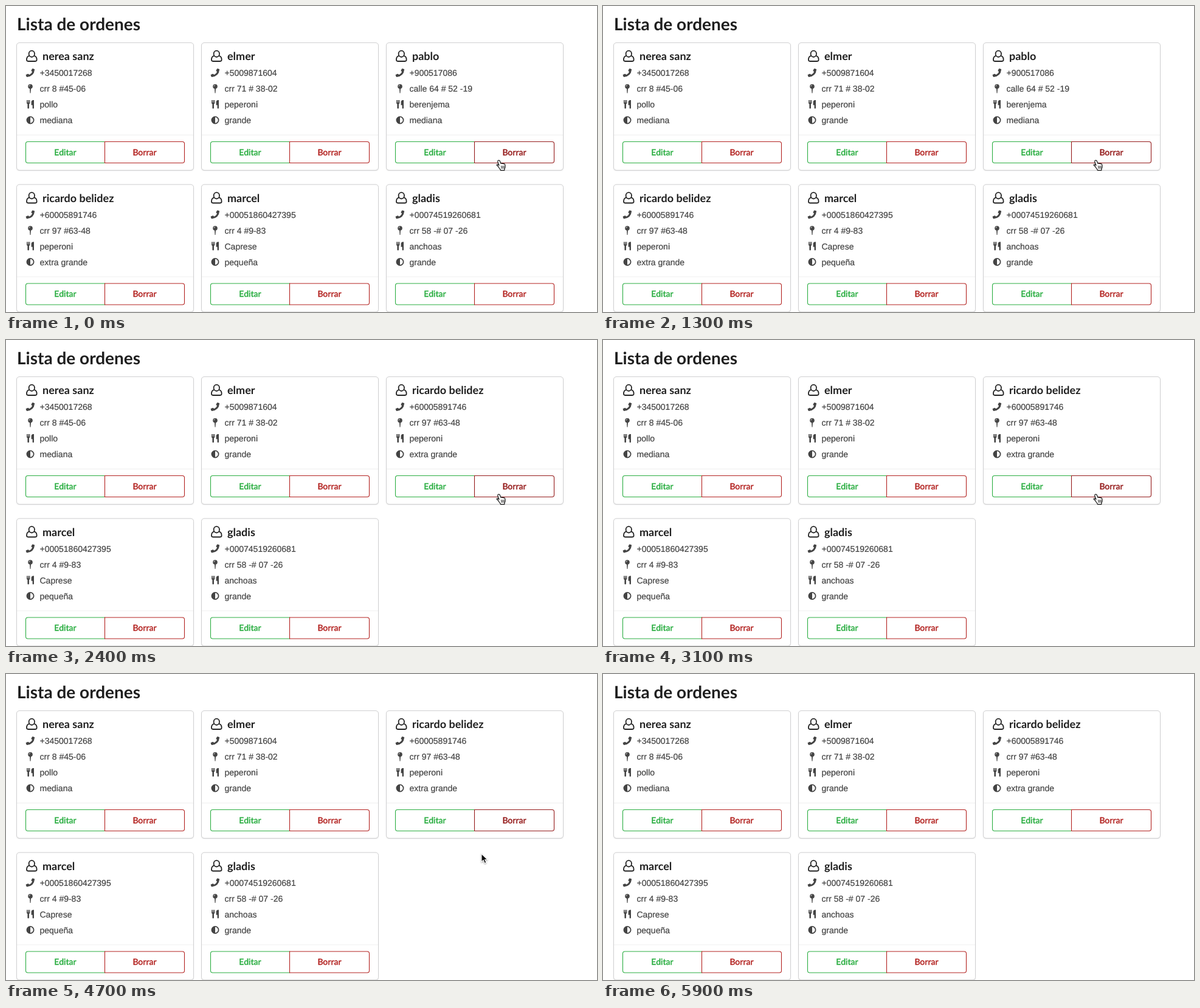
An HTML page for the animation above (6 s loop, 972 px wide and 504 px high).

```html
<!DOCTYPE html>
<html lang="es">
<head>
<meta charset="utf-8">
<title>Lista de ordenes</title>
<style>
  html, body { margin: 0; width: 100%; height: 100%; overflow: hidden; background: #fff; }
  svg { display: block; }
  text { white-space: pre; text-rendering: geometricPrecision; }
  .title, .name { font-family: Lato, sans-serif; font-weight: 700; fill: #1f1f1f; }
  .title { font-size: 28px; }
  .name { font-size: 18px; }
  .row { font: 14px "Liberation Sans", Arial, sans-serif; fill: #424242; stroke: #424242; stroke-width: .2px; }
  .btn { font: 500 14px Lato, sans-serif; text-anchor: middle; stroke-width: .35px; }
  .edit { --tone: #2bae42; }
  .del { --tone: #b32321; }
  .hover .del { --tone: #951b1b; }
  .edit path, .del path { fill: none; stroke: var(--tone); stroke-width: 1.1px; }
  .edit text, .del text { fill: var(--tone); stroke: var(--tone); }
  .card { fill: #fff; filter: drop-shadow(0 1px 1.2px #d4d4d5); }
  .edge { fill: none; stroke: #d0d0d1; }
</style>
</head>
<body>
<svg id="stage" width="972" height="504" viewBox="0 0 972 504">
  <defs>
    <g id="user" fill="none" stroke="#222" stroke-width="1.8">
      <ellipse cx="24.3" cy="17.8" rx="4.7" ry="5.2"/>
      <path d="M20.4 21.2C17.4 21.6 16 24.4 16 27.6Q16 30 18.4 30H30.2Q32.6 30 32.6 27.6C32.6 24.4 31.2 21.6 28.2 21.2"/>
    </g>
    <path id="phone" fill="#444" d="M26 42l2.8 1q.4.2.3.8Q28 55 16.500 56q-.6 0-.8-.4l-1-2.700q-.1-.5.4-.8l3-1.400q.5-.2.9.2l1.300 1.400Q24 50.500 25.200 47.300l-1.400-1.100q-.4-.4-.2-.9l1.300-2.900z"/>
    <g id="pin" fill="#444">
      <circle cx="22" cy="71.6" r="3.8"/>
      <path d="M21 75h2l-.5 7.500h-1z"/>
      <path d="M20 71.500q0-2 2-2.100" fill="none" stroke="#fff" stroke-width=".7"/>
    </g>
    <g id="food" fill="#444">
      <path d="M16 94h1.300v4h.7v-4h1.400v4h.7v-4h1.300v4.500q0 1.400-1.400 2v6.400q0 1.100-1.300 1.100t-1.300-1.100v-6.400q-1.400-.6-1.400-2z"/>
      <path d="M28 94v12.900q0 1.100-1.200 1.100t-1.200-1.100v-4.700h-2V97.500q0-3.200 3.200-3.500z"/>
    </g>
    <g id="size">
      <circle cx="22" cy="127" r="5.600" fill="none" stroke="#444" stroke-width="1.800"/>
      <path d="M22 121.500a5.500 5.500 0 0 0 0 11z" fill="#444"/>
    </g>
  </defs>
  <text class="title" x="18" y="39.500">Lista de ordenes</text>
  <g id="before"></g>
  <g id="after"></g>
  <g id="hand" transform="translate(810 254)" stroke="#111" stroke-linejoin="round" stroke-linecap="round">
    <path fill="#fff" stroke-width="1.200" d="M-.8.6q1.600-1.400 3 .6l1.600 4.200q1.200-1 2.400.2 1.200-.8 2.200.4 1.600-.6 2.200 1.200.9 3.200 0 5.400l-.8 2.200v1.800H3.300l-.4-1.400q-2-2-3.200-4.600-1.400-1.800-2.400-2.200-.6-1.800 1.600-1.400l2 1.400-2-5.400q-.4-1.600.3-2.400z"/>
    <path fill="none" stroke-width=".9" d="M4.700 9.500l.3 4M6.900 9.500v4M9 9.500l-.1 4"/>
  </g>
  <path id="arrow" fill="#0a0a0a" stroke="#fff" stroke-width="1.100" style="filter:drop-shadow(0 1px 1px #0006)" d="M0 0V13.500L3.100 10.700 5.300 15.700 7.900 14.600 5.700 9.700H9.800z"/>
</svg>
<script>
  const LOOP = 6000, STEP = 100, REMOVED = 1400, UNHOVER = 5000;

  const orders = [
    ["nerea sanz", "+3450017268", "crr 8 #45-06", "pollo", "mediana"],
    ["elmer", "+5009871604", "crr 71 # 38-02", "peperoni", "grande"],
    ["pablo", "+900517086", "calle 64 # 52 -19", "berenjema", "mediana"],
    ["ricardo belidez", "+60005891746", "crr 97 #63-48", "peperoni", "extra grande"],
    ["marcel", "+00051860427395", "crr 4 #9-83", "Caprese", "pequeña"],
    ["gladis", "+00074519260681", "crr 58 -# 07 -26", "anchoas", "grande"]
  ];

  // Arrow pointer: time, x, y of the tip
  const path = [
    [4600, 792, 280],
    [4700, 782, 296],
    [4800, 780, 378],
    [4900, 779, 490]
  ];
  const GONE = 5000;

  const $ = id => document.getElementById(id);

  function button(kind, label, x, outline) {
    return `<g class="${kind}"><path d="${outline}"/><text class="btn" x="${x}" y="184.500">${label}</text></g>`;
  }

  function card([name, ...rows], i) {
    const x = 18 + i % 3 * 304;
    const y = 61 + Math.floor(i / 3) * 233.5;
    const lines = rows.map((s, k) => `<text class="row" x="37.500" y="${54 + k * 26}">${s}</text>`).join("");
    const icons = ["user", "phone", "pin", "food", "size"].map(id => `<use href="#${id}"/>`).join("");
    return `<g transform="translate(${x} ${y})" class="${i === 2 ? "target" : ""}">
      <rect class="card" width="290" height="209" rx="4"/>
      <rect class="edge" x="-.5" y="-.5" width="291" height="210" rx="4.500"/>
      <path d="M0 151.500H290" stroke="#efefef"/>
      ${icons}<text class="name" x="42" y="28">${name}</text>${lines}
      ${button("edit", "Editar", 79.500, "M145 162.500H18a3.500 3.500 0 0 0-3.500 3.500v28a3.500 3.500 0 0 0 3.500 3.500H145")}
      ${button("del", "Borrar", 210, "M144.500 162.500H272a3.500 3.500 0 0 1 3.500 3.500v28a3.500 3.500 0 0 1-3.500 3.500H144.500z")}
    </g>`;
  }

  $("before").innerHTML = orders.map(card).join("");
  $("after").innerHTML = orders.filter((_, i) => i !== 2).map(card).join("");
  const targets = document.querySelectorAll(".target");
  const show = (id, on) => { $(id).style.display = on ? "" : "none"; };

  function draw(time) {
    const t = Math.floor(time % LOOP / STEP) * STEP;
    show("before", t < REMOVED);
    show("after", t >= REMOVED);
    targets.forEach(el => el.classList.toggle("hover", t < UNHOVER));

    const start = path[0][0];
    show("hand", t < start);
    show("arrow", t >= start && t < GONE);
    const spot = path.filter(p => p[0] <= t).pop();
    if (spot) $("arrow").setAttribute("transform", `translate(${spot[1]} ${spot[2]})`);
  }

  const origin = performance.now();
  function tick() {
    draw(performance.now() - origin);
    requestAnimationFrame(tick);
  }
  tick();
</script>
</body>
</html>
```
